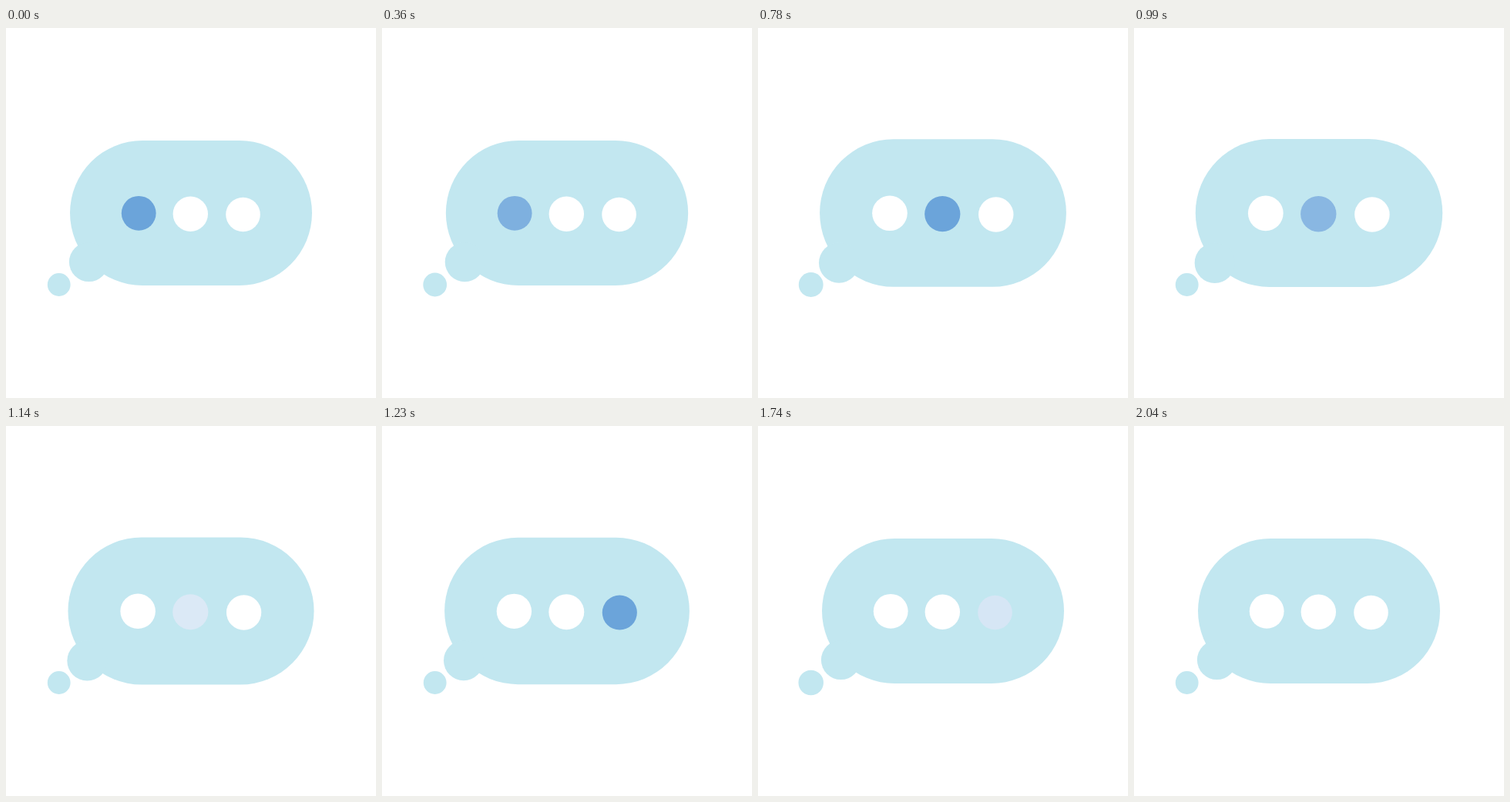
These frames come from a looping animation (480 px wide and 480 px high, 2070 ms). An HTML page with a canvas:

```html
<!DOCTYPE html>
<html lang="en">
<head>
<meta charset="utf-8">
<title>Typing bubble</title>
<style>
html, body { margin: 0; height: 100%; overflow: hidden; background: #fff; }
canvas { display: block; }
</style>
</head>
<body>
<canvas id="stage" width="480" height="480"></canvas>
<script>
const ctx = document.getElementById('stage').getContext('2d');
const LOOP = 2070, STEP = 30;
const BUBBLE = '#c2e7f0', BLUE = [107, 164, 218];
const DOTS = [
  { x: 172.2, y: 240.3, r: 22.4, start: 0 },
  { x: 239.3, y: 241.2, r: 22.7, start: 610 },
  { x: 307.5, y: 242, r: 22.3, start: 1220 }
];

const clamp = v => Math.min(1, Math.max(0, v));

// Smooth rise and fall from 0 to 1 and back around a peak time
function pulse(t, peak, half) {
  const d = Math.min(1, Math.abs(t - peak) / half);
  return Math.cos(d * Math.PI / 2) ** 2;
}

function circle(x, y, r, color) {
  ctx.fillStyle = color;
  ctx.beginPath();
  ctx.arc(x, y, r, 0, Math.PI * 2);
  ctx.fill();
}

// Each dot turns blue at once, holds, then fades to white
function dotColor(age) {
  const fade = age < 0 ? 1 : clamp((age - 325) / 270);
  return `rgb(${BLUE.map(c => Math.round(c + (255 - c) * fade))})`;
}

function draw(t) {
  ctx.fillStyle = '#fff';
  ctx.fillRect(0, 0, 480, 480);

  circle(68.7, 333, 14.9 + 1.5 * pulse(t % (LOOP / 2), 620, 420), BUBBLE);

  const scale = 1 + 0.021 * pulse(t, 930, 660);
  ctx.save();
  ctx.translate(240, 240);
  ctx.scale(scale, scale);
  ctx.translate(-240, -240);
  ctx.fillStyle = BUBBLE;
  ctx.beginPath();
  ctx.roundRect(83, 146, 314, 188, 94);
  ctx.fill();
  circle(107.5, 303.5, 25.6, BUBBLE);
  for (const d of DOTS) circle(d.x, d.y, d.r, dotColor(t - d.start));
  ctx.restore();
}

const begin = performance.now();
function tick() {
  const t = (performance.now() - begin) % LOOP;
  draw(Math.floor(t / STEP) * STEP);
  requestAnimationFrame(tick);
}
tick();
</script>
</body>
</html>
```
